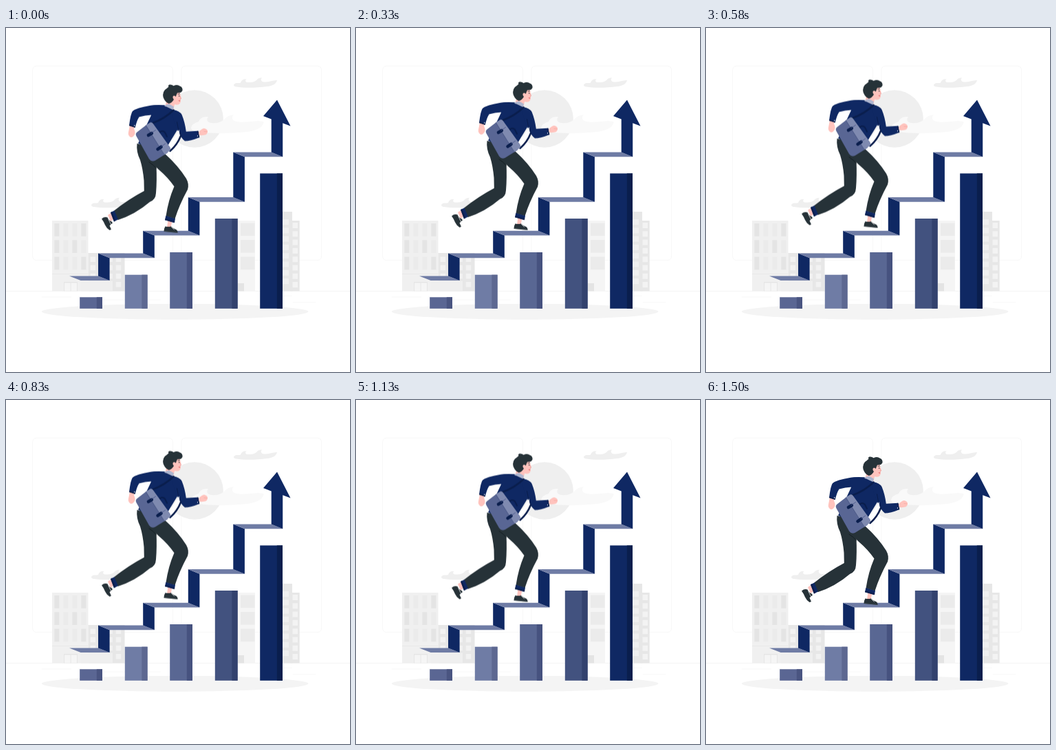
An HTML page for the animation above (1.54 s loop, 500 by 500 pixels).

```html
<!DOCTYPE html>
<html lang="en">
<head>
<meta charset="utf-8">
<title>Climbing the chart</title>
<style>
  html, body { margin: 0; width: 100%; height: 100%; overflow: hidden; background: #fff; }
  svg { display: block; width: 100%; height: 100%; }
  .navy { fill: #0f2863; }
  .deep { fill: #0a1e4d; }
  .dark { fill: #263238; }
  .skin { fill: #ffc3bd; }
  .line { fill: none; stroke-linecap: round; stroke-linejoin: round; }
</style>
</head>
<body>
<svg viewBox="0 0 500 500">
  <g fill="none" stroke="#f1f1f1" stroke-width=".6">
    <rect x="38.6" y="55.2" width="203.8" height="282.4" rx="5.7"/>
    <rect x="254.8" y="55.2" width="203.8" height="282.4" rx="5.7"/>
  </g>
  <path d="M0 382.5H500" stroke="#ebebeb" stroke-width=".5"/>
  <path d="M417 398.6h33M322 401.3h9M397 389.3h19M52 391h43M105 391h6M131 395.2h94" stroke="#ebebeb" stroke-width=".35"/>
  <g id="city"></g>
  <circle cx="274" cy="132" r="41.8" fill="#efefef"/>
  <path id="cloud" fill="#efefef" d="M331 82.5C334 78.500 338 81 341 79.500C342 75.500 346 73.500 349.500 74.500C346.500 77 349 79.500 353 79C358 79.500 361 78 364 76C366 73 369 72 372 72.200C369.500 75 371 78 375 78.500C382 79 388 75.500 394 76C393 81 387 84.500 379 85C366 87 346 87.500 335 85.500Q331 85 331 82.500Z"/>
  <path fill="#efefef" d="M124 257C127 253 131 255.500 134 254C135 250 139 248 142.500 249C139.500 251.500 142 254 146 253.500C151 254 154 252.500 157 250.500C159 247.500 162 246.500 165 246.700C162.500 249.500 164 252.500 168 253C175 253.500 181 250 187 250.500C186 255.500 180 259 172 259.500C159 261.500 139 262 128 260Q124 259.500 124 257Z"/>
  <path fill="#f9f9f9" d="M269 145C271 138 276 138 280 136C282 131 288 128 294 129.500C290 133 293 138 299 138C307 139 312 137 317 133C321 128 327 126 331 126.500C327 130 329 135 335 136C350 139 363 133 375 136.500C373 145 363 149.500 350 151C327 153.500 298 153.500 279 151Q269 150 269 145Z"/>
  <ellipse cx="245.700" cy="412.300" rx="193.800" ry="11.400" fill="#f4f4f4"/>
  <g id="bars"></g>
  <g id="stairs"></g>
  <path class="navy" d="M385.700 180.500V132.500L374 128L394 104.500L413.500 142.500L402.200 138.200V187.300Z"/>

  <g id="runner">
    <!-- rear foot -->
    <path class="skin" d="M148 272L156 267L160 276L152 281Z"/>
    <path class="dark" d="M139 277.500Q143 274 147.500 275.500Q149 279.500 153.500 281.500L155 283.500L150.500 287.500L153 293L150.500 294Q146 291 144 286.500Q142 281.500 139 277.500Z"/>
    <path class="line" d="M149 278.500L152.500 285.500" stroke="#fff" stroke-width=".7"/>
    <!-- front foot -->
    <path class="skin" d="M235.500 279L241.500 281L239.500 290H234Z"/>
    <path class="dark" d="M231.500 288.500Q235.500 289.500 240 288.500Q243 292 247 293Q249.700 294.300 249.500 298L229.500 296Q229.500 291.500 231.500 288.500Z"/>
    <path class="line" d="M240.500 289.500L244.500 293.200" stroke="#fff" stroke-width=".7"/>
    <path class="line" d="M230 295.300L249 297.300" stroke="#4a555b" stroke-width=".5"/>

    <!-- rear hand and sleeve -->
    <path class="skin" d="M180 141.500L187 143.500L186 147Q188.500 151 187 155Q184 160.500 180.500 158.500Q177 156 178 151.500Z"/>
    <path class="navy" d="M240 113.500Q222 111 209 113Q190 116 184 121Q181.300 124 179 141.800L187.800 144.800Q190 135 193.500 129.500Q202 127 212 126.500Z"/>
    <path d="M179.300 140.800L187.900 143.500L187.500 145L179 142.300Z" fill="#091b45"/>
    <circle cx="186.700" cy="142" r=".8" fill="#fff"/>

    <!-- legs -->
    <path class="dark" d="M190.500 168Q189 180 195 192Q199 205 200.500 222L200.800 237Q178 249 157 265.800L162.500 279.300Q188 271 209 253Q217.500 250 218 240Q219.500 222 218.500 200L228 181Z"/>
    <path class="dark" d="M193 166L201 184Q211 196 222 206Q235 217 244.500 230.500Q236 250 232.500 273.500L245.500 277.500Q252 257 264 235Q266.500 227 262 219Q250 200 231 183Z"/>
    <path class="line" d="M218.500 204Q214 199 208 195" stroke="#111a1e" stroke-width=".8"/>
    <path class="navy" d="M152 268.300L157.500 265.500L163 278.500L157 281.500Z"/>
    <path class="deep" d="M152 268.300L154 267.300L159.300 280.300L157 281.500Z"/>
    <path class="navy" d="M232.300 273L246 277.300L244.800 283.300L231 279.200Z"/>
    <path class="deep" d="M231.500 277.200L245.300 281.300L244.800 283.300L231 279.200Z"/>

    <!-- neck -->
    <path class="skin" d="M234 103L246 107L243.500 118L231 115Z"/>
    <path d="M230 112.500L237 110.500L244 114.500L242.500 120L233 117.500Z" fill="#aeb6d0"/>

    <!-- jacket -->
    <path class="navy" d="M209 113Q222 111.500 233 114.500L243.500 119.500Q251 121 254 127Q256 135 251 145L237 168L230 181L192 168Q201 148 211 127Z"/>
    <path class="navy" d="M243 119Q252 120.500 255.500 126Q260 137 261.800 150.800L279 149.800L281 159.200Q268 164.500 260 164.500Q254 160 249 148Q244 138 242 128Z"/>
    <path class="line deep" d="M248.500 137Q249 145 254 155" stroke="#091b45" stroke-width=".8"/>
    <path d="M278.200 149.800L279.500 149.700L281.300 159L280 159.600Z" fill="#091b45"/>
    <circle cx="278.500" cy="157" r=".7" fill="#fff"/>
    <path class="skin" d="M280 151.500Q284 146.500 288 146Q293 147 293 150.500Q292.500 155 289.500 155.500Q285 156.500 281 156Z"/>
    <path class="line" d="M288 150.500L292.500 151" stroke="#f2a29b" stroke-width=".6"/>

    <!-- strap and bag -->
    <path class="line" d="M254 157Q249 170 238.500 179" stroke="#0a1e4d" stroke-width="2.500"/>
    <path d="M251.500 148L237.500 171L238.500 175Q248 167 252.500 156Z" fill="#fff"/>
    <path class="line" d="M211.500 139Q231 132 243.500 119.500" stroke="#0a1e4d" stroke-width="2.500"/>
    <path class="line" d="M222 153Q227 147.500 231 152L234 158" stroke="#0a1e4d" stroke-width="2"/>
    <path d="M206 139.500L190.500 151.500Q187.500 154 189.500 157.500L208 190.500Q211.500 195.500 216.500 193L235 181.500Z" fill="#596694"/>
    <path d="M203.500 141.500L209.500 137.500Q212 136.500 214 139.500L238.500 173.500Q240 176.500 237.500 179L230 184.500Z" fill="#7f8ab0"/>
    <path class="line" d="M203.500 142L230 184" stroke="#465482" stroke-width=".8"/>
    <g class="line" stroke="#0a1e4d" stroke-width="4.600">
      <path d="M207 156L211.800 153.200M220.500 176.300L225.500 173"/>
    </g>
    <g class="line" stroke="#46538a" stroke-width=".8">
      <path d="M211 153L217.500 148.500M225 173L231.500 168.300"/>
    </g>

    <!-- head -->
    <path class="skin" d="M240 91L252.500 92.500Q254.500 99 253.800 107Q253 112 248 111.800Q241 111 238 107Z"/>
    <path class="dark" d="M229 102Q226.500 95 231 90Q234.500 87.500 236.500 85.500Q235 83.500 237.500 82.600Q241 82 243.500 84.200Q249 81.500 253 84.700Q257 86 256.500 91Q255 95 249 94.500Q247.500 97.500 246.800 100Q245 97.500 243 99Q241.500 102 244 104Q241 109.500 236.500 110Q231.500 108 229 102Z"/>
    <path class="line" d="M250 96.300L252.500 95.900" stroke="#263238" stroke-width=".8"/>
    <ellipse cx="251.700" cy="99" rx=".6" ry="1" class="dark"/>
    <path class="line" d="M253.300 99.500L254.500 103L253 103.500" stroke="#ed847e" stroke-width=".7" fill="none"/>
    <path d="M250.300 105.500L253.500 105.500Q252.700 107.800 250.300 105.500Z" fill="#d94b50"/>
  </g>
</svg>
<script>
  const byId = id => document.getElementById(id);

  function add(group, name, attrs) {
    const el = document.createElementNS("http://www.w3.org/2000/svg", name);
    for (const key in attrs) el.setAttribute(key, attrs[key]);
    group.append(el);
  }
  const box = (group, x, y, width, height, fill) => add(group, "rect", { x, y, width, height, fill });
  const poly = (group, fill, ...points) => add(group, "polygon", { fill, points: points.join(" ") });

  function windows(x, y, cols, rows, dx, dy, w, h, fill) {
    for (let r = 0; r < rows; r++)
      for (let c = 0; c < cols; c++)
        box(city, x + c * dx, y + r * dy, w, h, typeof fill === "string" ? fill : fill(c, r));
  }

  const city = byId("city");
  box(city, 67, 280, 52.5, 102.5, "#f0f0f0");
  windows(70.3, 284, 4, 3, 13, 24.3, 7, 18.7, (c, r) =>
    c === 0 || c === 3 && r !== 1 || c === 2 && r === 1 ? "#e4e4e4" : "#ebebeb");
  box(city, 67, 357, 52.5, 1, "#e9e9e9");
  box(city, 119.5, 327, 53, 55.5, "#e7e7e7");
  windows(122.5, 332.5, 4, 4, 12.4, 12.2, 7.5, 7.5, "#f2f2f2");
  box(city, 84, 369, 20, 13.500, "#e6e6e6");
  box(city, 85, 370.5, 8.5, 12, "#f5f5f5");
  box(city, 94.5, 370.5, 8.5, 12, "#f5f5f5");
  box(city, 109, 367.5, 46, 15, "#efefef");

  box(city, 330, 280, 32, 102.5, "#f5f5f5");
  windows(341, 283.5, 1, 3, 0, 24.5, 20.5, 18.7, "#ebebeb");
  box(city, 337, 371, 9, 11.5, "#e4e4e4");
  box(city, 398, 267, 18, 115.5, "#e7e7e7");
  box(city, 414, 280, 12.700, 102.5, "#e7e7e7");
  windows(402, 278, 1, 8, 0, 12.300, 9, 8, "#f0f0f0");
  windows(416.500, 283, 1, 8, 0, 12.300, 7.500, 8, "#f3f3f3");

  const bars = [
    [107.2, 391.3, "#5a6693", "#4a5581"],
    [172.8, 358.7, "#6f7ca5", "#5d6891"],
    [238.2, 326, "#596793", "#46527f"],
    [303.8, 277, "#42527f", "#33426e"],
    [369.2, 211.4, "#0f2863", "#0a1e4d"]
  ];
  for (const [x, y, front, side] of bars) {
    box(byId("bars"), x, y, 32.8, 407.8 - y, front);
    box(byId("bars"), x + 24.6, y, 8.2, 407.8 - y, side);
  }

  // Each step: left edge, right edge, height of the tread, height of the next one.
  const steps = [
    [92, 134, 360.4, 327.6],
    [134, 199.2, 327.6, 294.8],
    [199.2, 264.8, 294.8, 246],
    [264.8, 330.3, 246, 180.5],
    [330.3, 385.7, 180.5, 0]
  ];
  const stairs = byId("stairs"), dx = 16.6, dy = 6.7;
  for (const [x1, x2, y, next] of steps) {
    poly(stairs, "#6f7ca5", [x1, y], [x2, y], [x2 + dx, y + dy], [x1 + dx, y + dy]);
    if (next) poly(stairs, "#0f2863", [x2, next], [x2 + dx, next + dy], [x2 + dx, y + dy], [x2, y]);
  }

  const LOOP = 1540, PEAK = 740, REST = 1490, LIFT = 9.5;
  const rise = (y, ms) => ({ transform: `translateY(${y}px)`, offset: ms / LOOP });
  byId("runner").animate(
    [rise(0, 0), rise(-LIFT, PEAK), rise(0, REST), rise(0, LOOP)],
    { duration: LOOP, iterations: Infinity, easing: "linear" }
  );
</script>
</body>
</html>
```
